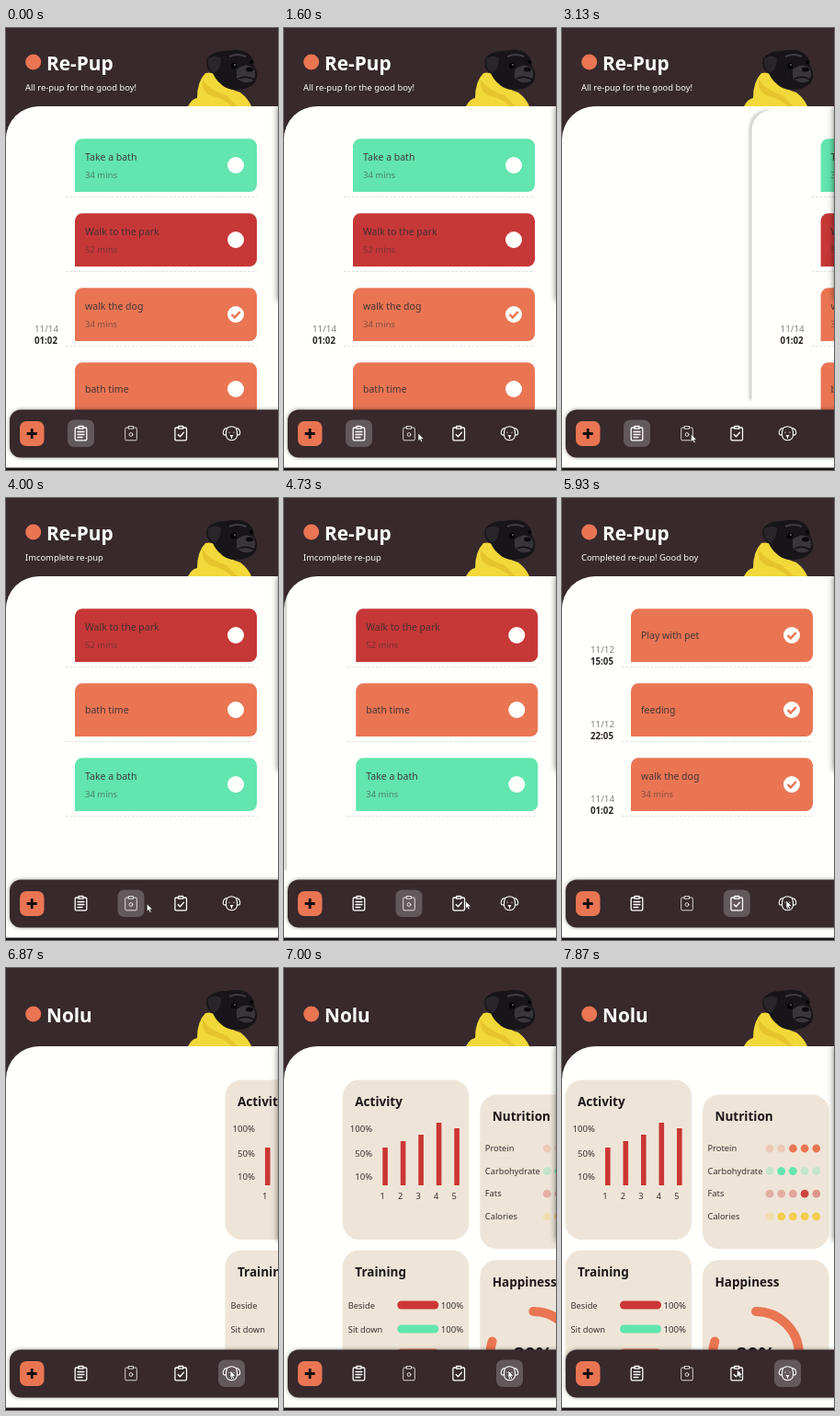
Animation, 296 px wide and 480 px high, one loop 8000 ms. Source, as an HTML page:

```html
<!DOCTYPE html>
<html lang="en">
<head>
<meta charset="utf-8">
<title>Pet task list</title>
<style>
  html, body { margin: 0; width: 100%; height: 100%; overflow: hidden; background: #fffffc; }
  svg { display: block; width: 100%; height: 100%; }
  text { font-family: "Noto Sans", "Open Sans", sans-serif; fill: #3a3032; white-space: pre; }
  .title { font-size: 20.8px; font-weight: 700; fill: #fff; }
  .subtitle { font-size: 9.4px; fill: #fff; }
  .task { font-size: 10.5px; opacity: .92; }
  .mins { font-size: 9.5px; opacity: .55; }
  .date { font-size: 9.8px; fill: #858182; }
  .time { font-size: 9.7px; font-weight: 600; fill: #2a2325; }
  .heading { font-size: 13.5px; font-weight: 700; fill: #1e1719; }
  .label { font-size: 9.3px; }
  .percent { font-size: 9.6px; }
  .lip { fill: none; stroke: #0003; stroke-width: 4; filter: blur(1.6px); }
  .edge { filter: drop-shadow(0 0 3.5px #0008); }
  .bar { fill: #37292c; filter: drop-shadow(0 0 2px #0006); }
  .icon { fill: none; stroke: #fff; stroke-width: 1.4; stroke-linecap: round; stroke-linejoin: round; }
</style>
</head>
<body>
<svg id="stage" viewBox="0 0 296 480" preserveAspectRatio="none"></svg>
<script>
const GREEN = '#62e5ae', RED = '#c63737', ORANGE = '#e97553', DARK = '#37292c', YELLOW = '#f6cc4c', WHITE = '#fffffc';
const LOOP = 8000, TICK = 200 / 3, WIDTH = 296;

const text = (cls, x, y, s, extra = '') => `<text class="${cls}" x="${x}" y="${y}" ${extra}>${s}</text>`;
const box = (x, y, w, h, r, fill) => `<rect x="${x}" y="${y}" width="${w}" height="${h}" rx="${r}" fill="${fill}"/>`;
const dot = (x, y, r, fill, opacity = 1) => `<circle cx="${x}" cy="${y}" r="${r}" fill="${fill}" opacity="${opacity}"/>`;

function taskCard({ name, color, mins, date, time, done }, i) {
  const y = 120.3 + 81 * i;
  return `<path d="M75 ${y + 57.7}V${y + 8}a8 8 0 0 1 8 -8H265a8 8 0 0 1 8 8v41.7a8 8 0 0 1 -8 8z" fill="${color}"/>`
    + text('task', 86, y + (mins ? 23.3 : 32.7), name)
    + (mins ? text('mins', 86, y + 42.7, mins + ' mins') : '')
    + dot(250, y + 28.7, 9, WHITE)
    + (done ? `<path d="M245.5 ${y + 28.7}l3.3 3.4l6 -6.4" fill="none" stroke="${color}" stroke-width="2.4"/>` : '')
    + `<path d="M65 ${y + 63.2}H273" stroke="#d9dadb" stroke-dasharray="3 1.5" stroke-width=".8"/>`
    + (date ? text('date', 31, y + 47.7, date) + text('time', 31, y + 60.7, time) : '');
}

const listPage = tasks => '<path class="lip" d="M20 91Q-1 91 -1 112V404"/>'
  + box(0, 89, 330, 360, 22, WHITE) + tasks.map(taskCard).join('');

const bath = { name: 'Take a bath', color: GREEN, mins: 34 };
const park = { name: 'Walk to the park', color: RED, mins: 52 };
const walk = { name: 'walk the dog', color: ORANGE, mins: 34, date: '11/14', time: '01:02', done: true };
const bathTime = { name: 'bath time', color: ORANGE };
const play = { name: 'Play with pet', color: ORANGE, date: '11/12', time: '15:05', done: true };
const feeding = { name: 'feeding', color: ORANGE, date: '11/12', time: '22:05', done: true };

function panel(x, y, h, name) {
  return box(x, y, 137.5, h, 18, '#eee5d8') + text('heading', x + 13.5, y + 28.5, name);
}

function activity() {
  const scale = [['100%', 178], ['50%', 205], ['10%', 230]];
  const tops = [195, 188, 181, 168, 174];
  return panel(3.5, 121.5, 173.5, 'Activity')
    + scale.map(([s, y]) => text('percent', 36, y, s, 'text-anchor="end"')).join('')
    + tops.map((y, i) => box(47 + 19.5 * i, y, 5.6, 236 - y, 0, '#cb3634')
      + text('label', 46.8 + 19.5 * i, 251, i + 1, 'text-anchor="middle"')).join('');
}

function nutrition() {
  const rows = [
    ['Protein', ORANGE, [.25, .25, 1, 1, 1]],
    ['Carbohydrate', GREEN, [.3, 1, 1, .3, .3]],
    ['Fats', '#cd4542', [.35, .35, .4, 1, .5]],
    ['Calories', YELLOW, [.3, 1, 1, 1, 1]]
  ];
  return panel(153, 137.5, 167.5, 'Nutrition') + rows.map(([name, color, levels], r) => {
    const y = 196 + 24.6 * r;
    return text('label', 158.5, y + 3.2, name)
      + levels.map((o, i) => dot(226 + 12.7 * i, y, 4.4, color, o)).join('');
  }).join('');
}

function training() {
  const rows = [['Beside', '#cb3634'], ['Sit down', GREEN], ['', ORANGE]];
  return panel(3.5, 306.5, 170, 'Training') + rows.map(([name, color], r) => {
    const y = 361.5 + 26 * r;
    return text('label', 9.5, y + 8.3, name) + box(63, y, 45, 9, 4.5, color)
      + (name ? text('percent', 110.5, y + 8.3, '100%') : '');
  }).join('');
}

function happiness() {
  return panel(153, 317, 160, 'Happiness')
    + `<circle cx="211" cy="420" r="47" fill="none" stroke="${ORANGE}" stroke-width="10" stroke-linecap="round"
        pathLength="100" stroke-dasharray="80 20" transform="rotate(-90 211 420)"/>`
    + text('heading', 211, 427, '80%', 'text-anchor="middle" style="font-size:21px"');
}

const APP = 'Re-Pup';
const pages = [
  { title: APP, subtitle: 'All re-pup for the good boy!', body: listPage([bath, park, walk, bathTime]) },
  { title: APP, subtitle: 'Imcomplete re-pup', body: listPage([park, bathTime, bath]) },
  { title: APP, subtitle: 'Completed re-pup! Good boy', body: listPage([play, feeding, walk]) },
  { title: 'Nolu', subtitle: '', body: activity() + nutrition() + training() + happiness() }
];

function header({ title, subtitle }) {
  const y = subtitle ? 0 : 13;
  return dot(29.7, 37 + y, 8.5, ORANGE) + text('title', 44, 45.8 + y, title) + text('subtitle', 21, 68, subtitle);
}

const portrait = `
  <path d="M198 85Q202 77 208 76Q208 58 217 49Q228 46 233 59Q242 66 255 70Q264 77 267 85z" fill="#f2d838"/>
  <path d="M214 56Q222 68 240 73L252 85H246Q236 76 222 73Q212 68 214 56z" fill="#e6c52c"/>
  <path d="M219 33Q226 24 240 25Q257 21 265 29Q270 34 270 41Q276 51 271 59Q265 66 253 67Q240 68 233 60Q228 56 225 49Q216 44 219 33z" fill="#171518"/>
  <path d="M220 33Q229 28 234 33Q234 44 227 49Q218 44 220 33z" fill="#29262a"/>
  <path d="M251 45Q261 37 269 43Q274 51 268 58Q258 62 251 54z" fill="#39363b"/>
  <path d="M243 31Q252 27 261 31" fill="none" stroke="#403c42" stroke-width="2"/>
  <ellipse cx="265" cy="45" rx="4" ry="2.5" fill="#09080a"/>
  <path d="M253 55Q262 51 270 56" fill="none" stroke="#0c0b0d" stroke-width="1.3"/>
  <circle cx="248" cy="41" r="3.2" fill="#050405"/><circle cx="267" cy="37" r="2" fill="#050405"/>
  <circle cx="249" cy="40" r=".8" fill="#aaa"/>`;

const clipboard = (x, inner, width = 1.3) => `<g class="icon" transform="translate(${x} 440)" style="stroke-width:${width}">
  <path d="M-2.5 -6H-5q-1.3 0 -1.3 1.3V6.5q0 1.3 1.3 1.3H5q1.3 0 1.3 -1.3V-4.7q0 -1.3 -1.3 -1.3H2.5M-2.5 -7.5H2.5v2.7H-2.5z"/>${inner}</g>`;

const iconX = [81.5, 136, 190.2, 245.5];
const icons = clipboard(iconX[0], '<path d="M-3.5 -1.5H3.5M-3.5 1.5H3.5M-3.5 4.5H1.5"/>')
  + clipboard(iconX[1], '<circle cy="1.5" r="1.9"/>', .8)
  + clipboard(iconX[2], '<path d="M-3 1.5l2.2 2.2l4 -4.5"/>')
  + `<g class="icon" transform="translate(${iconX[3]} 440)" style="stroke-width:1.1">
      <path d="M-5 -5.5Q0 -9 5 -5.5Q8.5 -5.5 9.3 -.5Q9 3 6 1.5Q6 7.5 0 7.8Q-6 7.5 -6 1.5Q-9 3 -9.3 -.5Q-8.5 -5.5 -5 -5.5zM-5 -5.5Q-6.2 -2 -6 1.5M5 -5.5Q6.2 -2 6 1.5M-1.3 2.5H1.3L0 4zM0 4V5.5"/>
      <path d="M-2.5 -1v.3M2.5 -1v.3"/></g>`;

document.getElementById('stage').innerHTML = `
  <defs><clipPath id="view"><path d="M0 440V121A36 36 0 0 1 36 85H296V440z"/></clipPath></defs>
  <rect width="296" height="480" fill="${WHITE}"/>
  <path d="M0 0H296V85H36A36 36 0 0 0 0 121z" fill="${DARK}"/>
  ${pages.map(p => `<g class="header">${header(p)}</g>`).join('')}
  ${portrait}
  <g clip-path="url(#view)">
    ${pages.map(p => `<g class="page">${p.body}</g>`).join('')}
    <rect class="edge" x="296" y="84" width="12" height="212"/>
  </g>
  <rect y="477.5" width="296" height="2.5" fill="#1c1517"/>
  <rect class="bar" x="4" y="414.5" width="320" height="52" rx="12"/>
  ${box(15, 427, 26.5, 27, 7, ORANGE)}
  <path d="M28.2 435v11M22.7 440.5h11" stroke="#150f10" stroke-width="2.8"/>
  <rect id="active" y="425.5" width="29" height="29.5" rx="7" fill="#63585b"/>
  ${icons}
  <path id="cursor" d="M0 0V8.4L1.9 6.7L3.2 9.6L4.7 8.9L3.4 6.2H6z" fill="#fff" stroke="#1a1416" stroke-width=".5"/>`;

const headers = document.querySelectorAll('.header');
const pageNodes = document.querySelectorAll('.page');
const active = document.getElementById('active');
const cursor = document.getElementById('cursor');

// Page changes: start of the slide, and the first moment it shows.
const switches = [[2933, 3133], [4733, 4733], [6600, 6600]];
const LEAVE = 301, ENTER = 244, SETTLED = 800;

// Pointer paths: time, x, y.
const paths = [
  [[533, 143.5, 297.5], [599, 143.5, 297.5]],
  [[933, 41, 433], [1000, 64.5, 433], [1267, 64.5, 433], [1400, 100, 444], [1533, 141, 444], [1600, 146, 440],
   [2467, 146, 440], [2667, 140.5, 441], [3133, 140.5, 441], [3733, 148.5, 440.5], [3933, 148.5, 440.5],
   [4200, 168, 441], [4533, 197.5, 437.5], [5533, 197.5, 437.5], [5933, 244, 437], [7467, 244, 437],
   [7867, 190.5, 436], [8000, 190.5, 436]]
];

function pointerAt(t) {
  const path = paths.find(p => t >= p[0][0] - 1 && t <= p[p.length - 1][0]);
  if (!path) return null;
  const i = Math.max(1, path.findIndex(p => p[0] >= t));
  const [a, b] = [path[i - 1], path[i]];
  const k = Math.max(0, (t - a[0]) / (b[0] - a[0]));
  return [a[1] + (b[1] - a[1]) * k, a[2] + (b[2] - a[2]) * k];
}

function pageAt(t) {
  let page = 0, offset = 0;
  switches.forEach(([start, shown], i) => {
    const dt = t - start;
    if (t < shown - 1) return;
    if (dt < ENTER - 10) {
      page = i;
      offset = WIDTH * ((dt + TICK) / LEAVE) ** 3;
    } else {
      page = i + 1;
      offset = dt > SETTLED - 2 ? 0 : WIDTH * Math.exp(-.0102 * Math.max(0, dt - ENTER));
    }
  });
  return { page, offset };
}

function render(ms) {
  const t = Math.floor((ms + 4) / TICK) * TICK;
  const { page, offset } = pageAt(t);
  pageNodes.forEach((node, i) => {
    node.style.display = headers[i].style.display = i === page ? '' : 'none';
  });
  pageNodes[page].setAttribute('transform', `translate(${offset.toFixed(2)} 0)`);
  active.setAttribute('x', iconX[page] - 14.5);
  const at = pointerAt(t);
  cursor.style.display = at ? '' : 'none';
  if (at) cursor.setAttribute('transform', `translate(${at[0].toFixed(2)} ${at[1].toFixed(2)})`);
}

const began = performance.now();
function frame() {
  render((performance.now() - began) % LOOP);
  requestAnimationFrame(frame);
}
frame();
</script>
</body>
</html>
```
